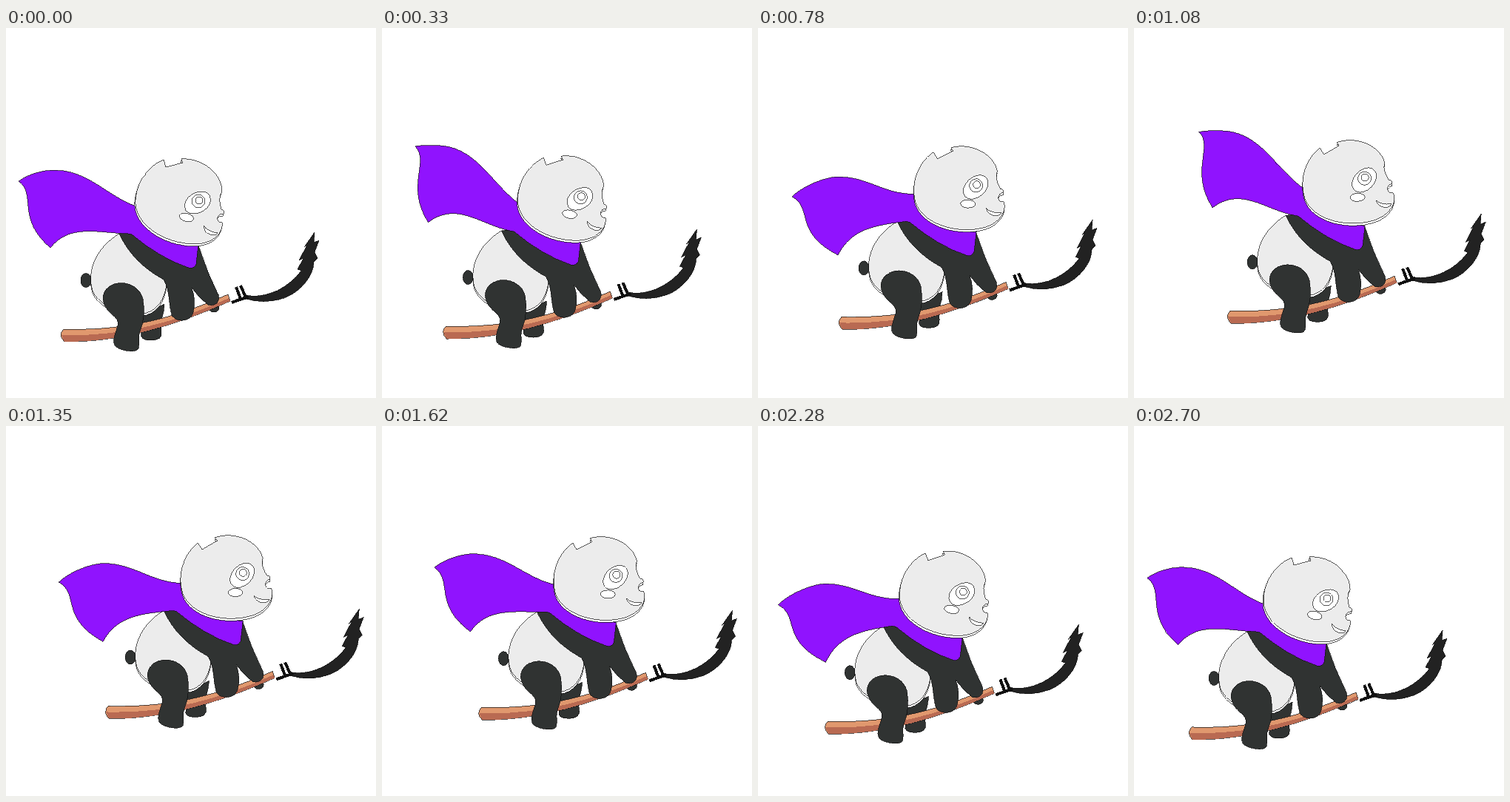
An HTML page for the animation above (2730 ms loop, 500x500 px).

```html
<!DOCTYPE html>
<html lang="en">
<head>
<meta charset="utf-8">
<title>Flying panda</title>
<style>
  html, body { margin: 0; width: 100%; height: 100%; overflow: hidden; background: #fff; }
  svg { display: block; width: 100vw; height: 100vh; shape-rendering: crispEdges; }
  #flyer { stroke: #111; stroke-width: .7; }
  .dark { fill: #303332; }
  .light { fill: #ececec; }
  .white { fill: #fff; }
  .wood { fill: #e0986e; }
  .shade { fill: #b96a52; stroke: none; }
  .bristle { fill: #222; }
  .binding { fill: none; stroke-width: 4; }
  #cape { fill: #9013fe; }
</style>
</head>
<body>
<svg viewBox="0 0 500 500">
  <defs>
    <path id="skull" d="M213 178L216 188L239 182L237 177C264 175 292 196 292 221C287 228 289 238 291 245Q296 246 294 251C284 250 283 264 292 263C294 278 278 292 255 292C215 292 172 265 175 232C177 205 195 185 213 178Z"/>
    <path id="belly" d="M153 278C120 298 109 330 117 355C126 377 160 389 190 385Q218 376 218 330L172 278Z"/>
  </defs>
  <g id="flyer">
    <ellipse class="dark" cx="108" cy="341" rx="7" ry="9.5"/>
    <path class="dark" d="M186 386L214 373C214 388 207 396 210 410Q212 422 196 422Q180 422 183 412Z"/>
    <ellipse class="dark" cx="281" cy="378" rx="7" ry="6"/>
    <use href="#belly" class="white" y="3"/>
    <use href="#belly" class="light"/>

    <path class="wood" d="M78 407C150 409 215 398 300 360L303 369C225 404 150 425 79 424Q70 415 78 407Z"/>
    <path class="shade" d="M75 415C150 417 220 402 301 365L303 369C225 404 150 425 79 424Z"/>

    <path class="dark" d="M131 366C131 338 178 337 185 366Q189 390 181 410C178 418 181 425 179 433C176 440 152 436 147 429C143 422 149 410 151 402C154 388 134 388 131 366Z"/>
    <path class="dark" d="M153 278C165 304 184 324 213 340C222 355 219 370 224 388C229 398 250 398 253 384Q257 368 251 351Q260 364 273 374C284 377 290 369 287 360Q271 328 260 294L172 276Z"/>

    <path class="bristle" d="M324 361C345 366 378 356 399 328L394 326L402 311L396 314L407 293L403 296L417 276L416 290L423 287L417 303L421 311L416 316C416 335 398 356 378 364Q351 374 324 366Z"/>
    <path class="binding" d="M305 371L316 367L328 363M311 350L317 366M317 348L324 364"/>

    <path id="cape"/>
    <g id="head">
      <use href="#skull" class="white" x="-1" y="3"/>
      <use href="#skull" class="light"/>
      <ellipse class="white" cx="259" cy="236" rx="19" ry="13.5" transform="rotate(-30 259 236)"/>
      <circle class="white" cx="260" cy="234" r="9"/>
      <circle class="white" cx="261" cy="233" r="5"/>
      <ellipse class="white" cx="244" cy="256" rx="10" ry="5.5" transform="rotate(14 244 256)"/>
      <path class="white" d="M267 267Q272 275 286 277Q281 283 272 277Q267 273 267 267Z"/>
    </g>
  </g>
</svg>
<script>
const LOOP = 2730, STEP = 30;
const get = id => document.getElementById(id);
const flyer = get('flyer'), head = get('head'), cape = get('cape');

// Eased value at time t between [time, value] keys.
function tween(keys, t) {
  const i = keys.findIndex(([time]) => time > t);
  const [t0, a] = keys[i - 1], [t1, b] = keys[i];
  const u = (t - t0) / (t1 - t0);
  return a + (b - a) * u * u * (3 - 2 * u);
}

const swing = (peak, t) => tween([[0, 0], [peak, 1], [LOOP, 0]], t);

// Droop of the cape: -1 raised, 1 lowered.
const flap = [[0, 0], [360, -1], [720, 1], [1080, -.95], [1430, 1], [1850, -.75], [2260, 1], [2500, -.8], [LOOP, 0]];

// Three loose points (tip, crest, corner) swing with the droop d.
function capePath(d) {
  const tip = [17 - 13 * d + 7 * d * d, 207 + 44 * d];
  const crest = [65 + 6 * d + 5 * d * d, 192 + 30 * d];
  const corner = [60 + 11 * d + 5 * d * d, 297 + 31 * d];
  const from = ([x, y], dx, dy) => [x + dx, y + dy];
  return `M165 278C125 ${277 + 7 * d} ${86 + 7 * d * d} ${264 + 27 * d} ${corner}
    C${from(corner, -47 - 16 * d, -40 + 10 * d)} ${from(tip, 25 + 5 * d, 18 - 2 * d)} ${tip}
    C${from(tip, 11 + 3 * d, -8 - 7 * d)} ${from(crest, -18, 0)} ${crest}
    C${from(crest, 46 - 8 * d, 0)} ${[136, 227 + 17 * d]} 176 241
    C178 265 215 290 260 292L257 319Q254 326 247 324Q208 311 170 279Z`;
}

function draw(now) {
  const t = Math.floor(now % LOOP / STEP) * STEP;
  const glide = swing(1410, t);
  flyer.setAttribute('transform', `translate(${60.5 * glide} ${-28.7 * glide})`);
  head.setAttribute('transform', `rotate(${-16 * swing(1170, t)} 238 233)`);
  cape.setAttribute('d', capePath(tween(flap, t)));
  requestAnimationFrame(draw);
}
draw(0);
</script>
</body>
</html>
```
